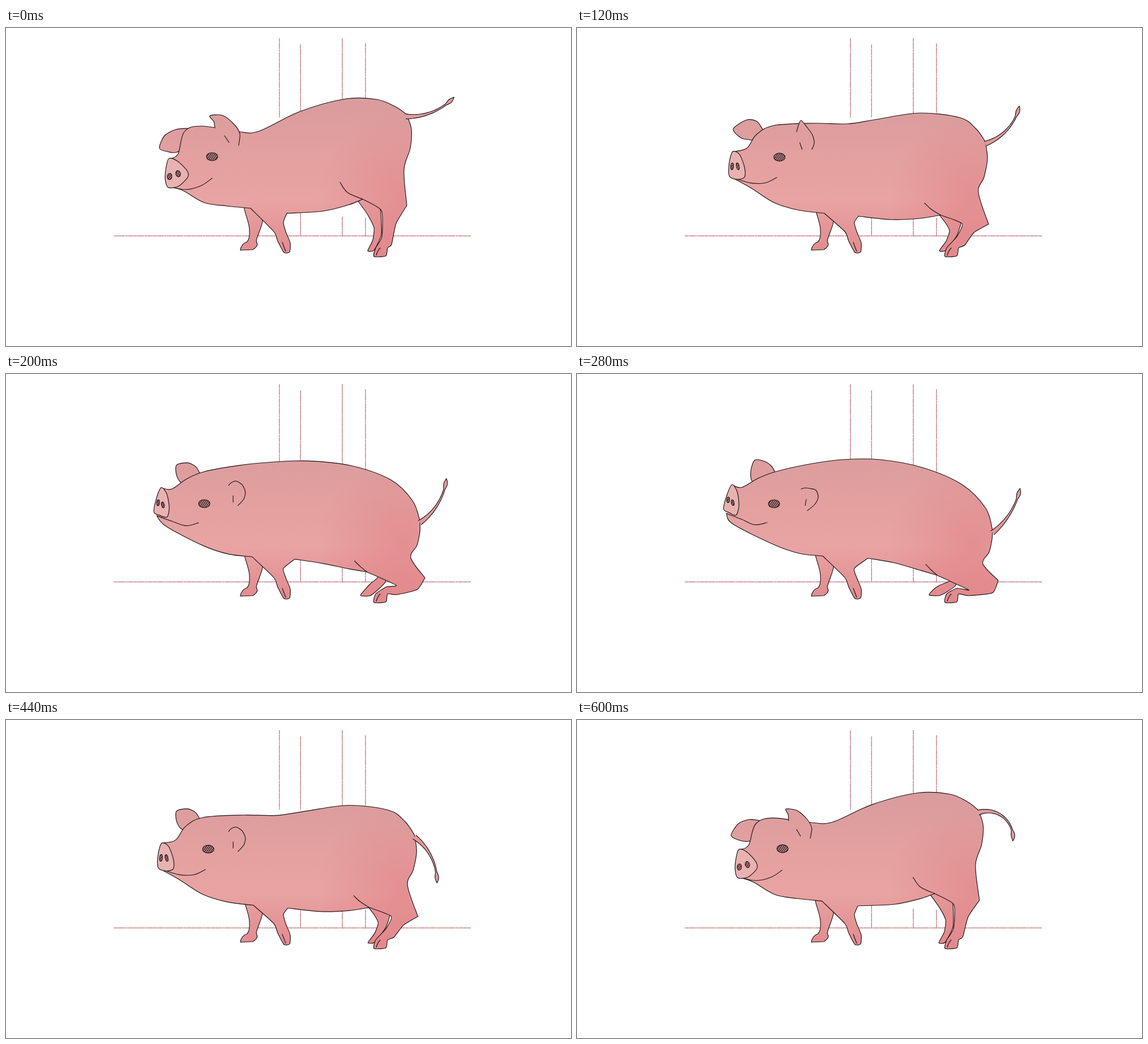
Recreate the animation shown at these times as an HTML page. Size 998 by 561 pixels, loop 0.64 s.

```html
<!DOCTYPE html>
<html lang="en">
<head>
<meta charset="utf-8">
<title>Pig</title>
<style>
  html, body { margin: 0; width: 100%; height: 100%; overflow: hidden; background: #fff; }
  svg { display: block; width: 100%; height: 100%; }
  .rule { fill: none; stroke: #c4858a; stroke-width: 1.5; stroke-dasharray: 7 .5 12 .8 4 .6 9 .4; }
  .skin { fill: url(#skin); }
  .ink { stroke: #1c1315; stroke-width: 1.15; stroke-linejoin: round; stroke-linecap: round; }
  .line { fill: none; }
  .hatch { fill: url(#hatch); }
</style>
</head>
<body>
<svg viewBox="0 0 998 561">
  <defs>
    <linearGradient id="tone" gradientUnits="userSpaceOnUse" x1="0" y1="120" x2="0" y2="405">
      <stop offset="0" stop-color="#d99b9c"/>
      <stop offset=".35" stop-color="#e2a09f"/>
      <stop offset=".65" stop-color="#e8a4a3"/>
      <stop offset=".82" stop-color="#e59597"/>
      <stop offset="1" stop-color="#e28a8d"/>
    </linearGradient>
    <radialGradient id="blush" gradientUnits="userSpaceOnUse" cx="700" cy="300" r="150">
      <stop offset="0" stop-color="#e07b81" stop-opacity=".5"/>
      <stop offset="1" stop-color="#e07b81" stop-opacity="0"/>
    </radialGradient>
    <pattern id="skin" patternUnits="userSpaceOnUse" width="998" height="561">
      <rect width="998" height="561" fill="url(#tone)"/>
      <rect width="998" height="561" fill="url(#blush)"/>
    </pattern>
    <pattern id="hatch" patternUnits="userSpaceOnUse" width="3" height="3" patternTransform="rotate(35)">
      <rect width="3" height="3" fill="#cf9394"/>
      <rect width="1.4" height="3" fill="#2a1c1e"/>
    </pattern>
  </defs>
  <path class="rule" d="M190.5 366.8H821M483 18V158M520.3 29V158M594 18V166M635 27V180M520.3 315V368M594 333V368M635 335V368"/>
  <path id="farEar" class="skin ink"/>
  <path id="farHind" class="skin ink"/>
  <path class="skin ink" d="M419 308C421 327 429 340 430 355Q431 372 426 377Q415 381 414 392L436 391Q444 386 444 381Q441 376 443 372C446 362 451 352 453 342L455 312"/>
  <path id="body" class="skin ink"/>
  <path id="tail" class="skin ink"/>
  <path id="ear" class="skin ink"/>
  <path id="details" class="line ink"/>
  <path id="snout" class="ink" fill="#e8b2b0"/>
  <ellipse id="nostrilL" class="hatch ink"/>
  <ellipse id="nostrilR" class="hatch ink"/>
  <ellipse id="eye" class="hatch ink"/>
  <path class="line ink" d="M654 401Q656 393 661 388M488 378L494 394"/>
</svg>
<script>
const LOOP = 640, STEP = 40, MIDDLE = .4;
const TIMES = [0, 120, 200, 280, 360, 440, 600];

// Controls over the loop: 0 is standing, 1 is crouching; tail angles in degrees.
const tracks = {
  crouch: [0, .4, .86, 1, .68, .42, .06],
  ears: [0, .4, .8, 1, 1, .8, .1],
  tailAim: [-23, -49, -60, -59, 67, 65, 42],
  tailBend: [-25, -30, -25, -20, 30, 28, 58]
};

const points = text => text.split(' ').map(p => p.split(',').map(Number));

// Each part: standing, half-way (optional) and crouching.
const shapes = {
  back: [
    '290,231 304,222 315,183 345,173 411,183 447,182 520,147 600,125 655,126 688,139 707,152',
    '277,218 300,212 317,188 348,172 420,168 478,169 530,161 605,150 676,158 704,177 721,200',
    '275,196 291,200 320,184 352,172 410,159 470,151 535,151 610,165 680,195 722,237 734,276'],
  rump: [
    '716,178 714,212 703,250 708,313',
    '725,230 719,263 709,290 727,346',
    '733,292 728,314 717,335 744,364'],
  shinBack: ['689,345 681,382', '701,361 685,383', '734,386 692,391'],
  shinFront: ['664,368 663,322 630,302', '671,368 680,345 642,330', '672,378 692,381 636,355'],
  belly: ['605,312 560,323 496,327', '605,336 555,338 497,332', '605,346 560,333 514,325'],
  chin: [
    '432,318 390,314 350,308 313,287 289,280',
    '437,327 390,321 348,308 307,282 274,264',
    '434,321 395,317 350,302 276,265 264,246'],
  snout: [
    '287,231 303,235 320,252 321,263 305,279 286,281 281,262',
    '275,218 287,223 296,246 296,263 283,267 269,261 269,237',
    '274,195 283,208 286,232 281,249 268,244 259,238 265,213'],
  nostrils: ['289,262 304,257 4,5.5', '274,244 284,244 2.4,6', '267,222 275,227 2.4,5'],
  eye: ['364,227 10,7', '348,229 10,7'],
  mouth: ['318,285 345,278 364,265', '290,256 314,266 336,262'],
  thigh: ['590,272 603,290', '614,309 626,320', '616,336 625,345'],
  farHind: [
    '618,300 638,328 650,352 648,374 639,393 650,392 663,364 661,318 650,295',
    '636,325 651,344 658,358 652,376 640,393 652,392 671,366 678,342 665,320',
    '670,360 655,367 640,373 630,380 622,390 640,391 654,384 668,374 674,360'],
  farEar: [
    '323,177 300,179 280,190 271,212 285,218 302,219 335,200',
    '328,179 318,165 300,162 276,178 290,194 312,198 335,200',
    '351,176 344,163 331,154 314,152 307,171 310,190 335,200'],
  ear: [
    '369,176 367,165 360,155 382,154 402,169 413,186 411,207',
    '388,183 391,172 396,163 407,176 416,189 419,203 415,214',
    '396,203 402,201 412,202 422,205 426,217 420,230 407,241'],
  earFold: ['386,190 394,202', '405,221 403,232']
};
for (const name in shapes) shapes[name] = shapes[name].map(points);

// The feet stay planted.
const hindFoot = points('674,388 671,402 650,403 653,388');
const foreLeg = points('490,343 494,359 502,379 501,395 491,396 480,376 473,359');

const el = id => document.getElementById(id);
const draw = (id, d) => el(id).setAttribute('d', d);

// Smooth cyclic interpolation of a control.
function control(name, t) {
  const values = tracks[name], n = TIMES.length;
  const time = i => TIMES[(i + n) % n] + Math.floor(i / n) * LOOP;
  const value = i => values[(i + n) % n];
  const slope = i => (value(i + 1) - value(i - 1)) / (time(i + 1) - time(i - 1));
  const k = TIMES.findLastIndex(key => key <= t);
  const span = time(k + 1) - time(k), u = (t - time(k)) / span, v = 1 - u;
  return (1 + 2 * u) * v * v * value(k) + u * u * (3 - 2 * u) * value(k + 1)
    + u * v * span * (v * slope(k) - u * slope(k + 1));
}

function blend(name, amount) {
  const poses = shapes[name], last = poses.length - 1;
  let from = poses[0], to = poses[last], u = amount;
  if (last === 2 && amount < MIDDLE) [to, u] = [poses[1], amount / MIDDLE];
  else if (last === 2) [from, u] = [poses[1], (amount - MIDDLE) / (1 - MIDDLE)];
  return from.map((p, i) => p.map((v, j) => v + (to[i][j] - v) * u));
}

// Spline through the points; a smaller pull gives firmer corners.
function curve(pts, { pull = 1 / 6, start = 'M', closed = false } = {}) {
  const len = pts.length;
  const at = i => closed ? pts[(i + len) % len] : pts[Math.max(0, Math.min(len - 1, i))];
  const handle = (i, sign) => at(i).map((v, j) => v + sign * pull * (at(i + 1)[j] - at(i - 1)[j]));
  let d = start + at(0);
  for (let i = 0; i < (closed ? len : len - 1); i++)
    d += `C${handle(i, 1)} ${handle(i + 1, -1)} ${at(i + 1)}`;
  return d + (closed ? 'Z' : '');
}

// Tapered circular arc from the rump, ending in a small tuft.
function tailShape([x, y], aim, bend) {
  const count = 24, size = 94, left = [], right = [];
  for (let i = 0; i <= count; i++) {
    const s = i / count, heading = (aim + bend * (2 * s - 1)) * Math.PI / 180;
    const dx = Math.cos(heading), dy = Math.sin(heading);
    const half = s < .8 ? 1.2 + 3.2 * (1 - s / .8) ** 2
      : 6 * (1 - s) + 2.6 * Math.sin((s - .8) * 5 * Math.PI);
    left.push([x - dy * half, y + dx * half]);
    right.unshift([x + dy * half, y - dx * half]);
    x += dx * size / count;
    y += dy * size / count;
  }
  return 'M' + left.concat(right).join('L');
}

function oval(id, [cx, cy], [rx, ry], tilt = 0) {
  const node = el(id);
  Object.entries({ cx, cy, rx, ry, transform: `rotate(${tilt} ${cx} ${cy})` })
    .forEach(([key, value]) => node.setAttribute(key, value));
}

function render(t) {
  const crouch = control('crouch', t), ears = control('ears', t);
  const part = name => blend(name, crouch);
  const firm = { pull: .1 }, soft = { pull: .14 };

  const back = part('back'), rump = part('rump'), belly = part('belly'), chin = part('chin');
  const shin = part('shinFront');
  const rumpTop = back.at(-1), hock = rump.at(-1), groin = shin.at(-1), elbow = belly.at(-1);
  const follow = { start: 'L' }, followFirm = { start: 'L', pull: .1 };
  draw('body', curve(back)
    + curve([rumpTop, ...rump], follow)
    + curve([hock, ...part('shinBack'), ...hindFoot, ...shin], followFirm)
    + curve([groin, ...belly], follow)
    + curve([elbow, ...foreLeg, chin[0]], followFirm)
    + curve(chin, follow));

  draw('farHind', curve(part('farHind'), firm));
  draw('farEar', curve(blend('farEar', ears), soft));
  draw('ear', curve(blend('ear', ears), soft));
  draw('tail', tailShape([rumpTop[0], rumpTop[1] + 4], control('tailAim', t), control('tailBend', t)));
  draw('details', curve([chin.at(-1), ...part('mouth')])
    + curve([...part('thigh'), groin])
    + curve(blend('earFold', ears)));
  draw('snout', curve(part('snout'), { ...soft, closed: true }));

  const [left, right, radii] = part('nostrils');
  oval('nostrilL', left, radii, 5);
  oval('nostrilR', right, radii, -12);
  oval('eye', ...part('eye'));
}

const begin = performance.now();
function tick() {
  const t = (performance.now() - begin) % LOOP;
  render(Math.floor(t / STEP) * STEP);
  requestAnimationFrame(tick);
}
tick();
</script>
</body>
</html>
```
